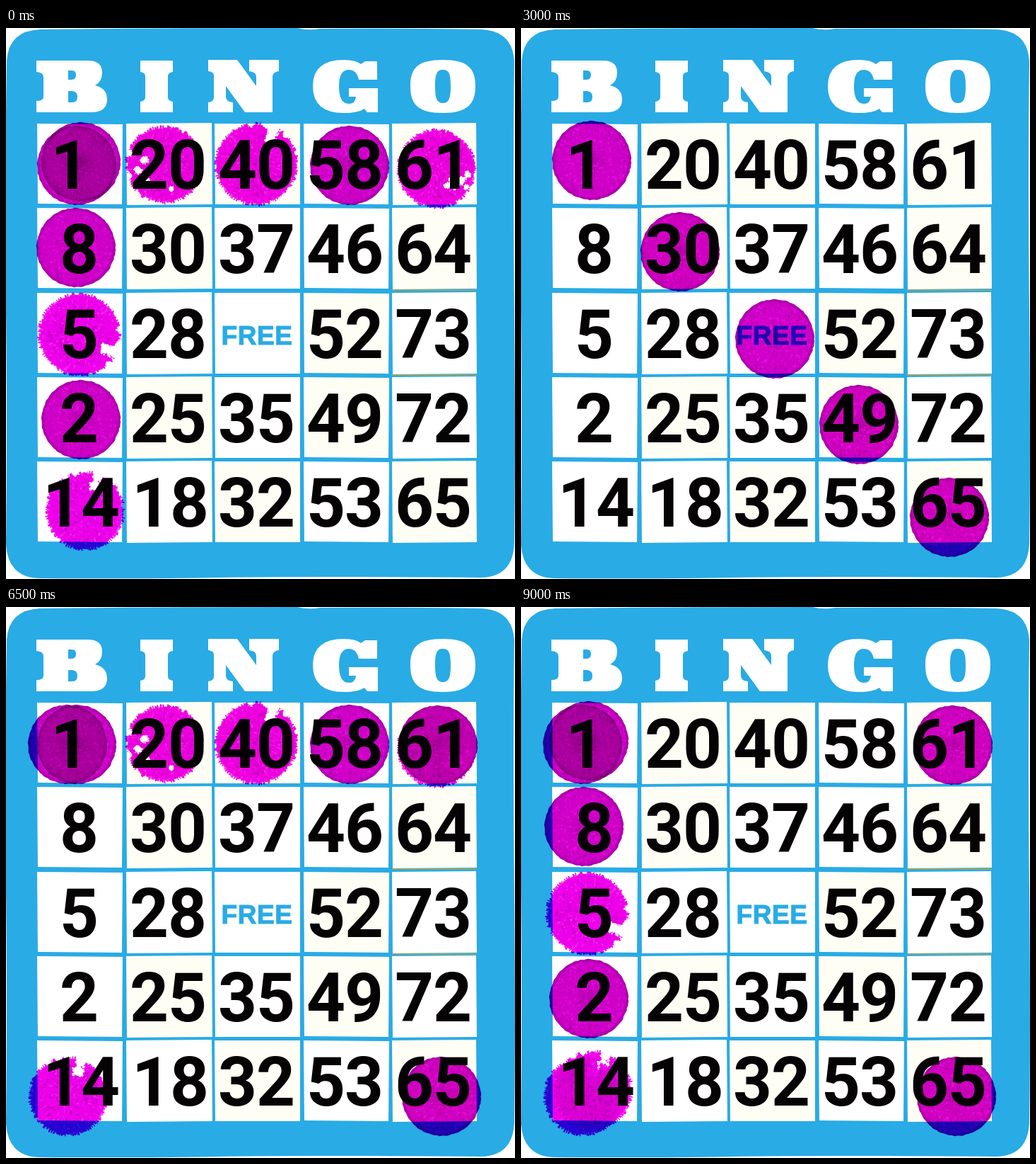
An HTML page with a canvas for the animation above (9500 ms loop, 720 by 778 pixels).

```html
<!DOCTYPE html>
<html lang="en">
<head>
<meta charset="utf-8">
<title>Bingo card</title>
<style>
  html, body { margin: 0; width: 100%; height: 100%; overflow: hidden; background: #fff; }
  body { position: relative; isolation: isolate; }
  svg, canvas { position: absolute; left: 0; top: 0; width: 720px; height: 778px; display: block; }
  canvas { mix-blend-mode: multiply; }
  .num { font: 600 96px Roboto, "Liberation Sans", sans-serif; letter-spacing: -1px; text-anchor: middle; fill: #050304; }
  .free { font: 700 37px "Liberation Sans", Arial, sans-serif; letter-spacing: .6px; text-anchor: middle; fill: #29abe5; stroke: #29abe5; }
</style>
</head>
<body>
<svg id="card" viewBox="0 0 720 778">
  <path fill="#29abe5" d="M48 2Q200 0 412 0Q428 4 444 1Q580 0 672 2Q717 4 719 48Q717 200 719 400T719 728Q717 775 672 776Q400 774 300 776T46 777Q3 775 0 730Q2 560 0 400T1 46Q4 4 48 2Z"/>
  <g fill="#fff" fill-rule="evenodd" role="img" aria-label="BINGO">
    <path d="M43 46H116Q136 46 136 63Q136 76 126 81Q143 85 143 101Q143 119 120 119H43V103Q53 103 53 97V69Q53 63 43 62ZM88 60H93Q99 60 99 66Q99 73 93 73H88ZM88 89H94Q101 90 101 97Q101 105 94 105H88Z"/>
    <path d="M190 46H236V62Q229 63 229 68V98Q229 103 236 104V119H190V104Q197 103 197 98V68Q197 63 190 62Z"/>
    <path d="M286 45H327L354 82V69Q354 62 344 61V45H386V61Q378 62 377 68V119H338L311 82V97Q311 104 321 105V119H286V105Q294 104 294 98V67Q294 62 286 61Z"/>
    <path d="M478 45Q495 45 502 51L508 47H525V73H499Q496 59 485 59Q471 59 471 82Q471 107 485 107Q494 107 495 97H485V85H526V119H511L507 114Q498 120 478 120Q434 120 434 82Q434 45 478 45Z"/>
    <path d="M618 45C653 45 664 57 664 82S653 120 618 120S572 108 572 82S583 45 618 45ZM618 59C609 59 607 66 607 82S609 106 618 106S629 98 629 82S627 59 618 59Z"/>
  </g>
</svg>
<canvas id="ink" width="720" height="778"></canvas>
<script>
const card = document.getElementById('card');
const ink = document.getElementById('ink').getContext('2d');

// ---- Card ----
function add(tag, attrs, text) {
  const el = document.createElementNS('http://www.w3.org/2000/svg', tag);
  for (const k in attrs) el.setAttribute(k, attrs[k]);
  if (text) el.textContent = text;
  card.append(el);
}

const lefts = [44, 170, 295, 421, 546], rights = [165, 291, 416, 542, 665];
const tops = [135, 254, 374, 493, 612];
const centers = [103, 229, 354, 479, 604];
const numbers = [
  [1, 20, 40, 58, 61],
  [8, 30, 37, 46, 64],
  [5, 28, 'FREE', 52, 73],
  [2, 25, 35, 49, 72],
  [14, 18, 32, 53, 65]
];
const cream = [20, 40, 61, 30, 64, 52, 25, 49, 32, 65];
const nudged = { 1: 90, 14: 106, 18: 232 };

numbers.forEach((row, r) => row.forEach((n, c) => {
  const x = lefts[c], y = tops[r], right = rights[c], bottom = y + 114;
  const skew = (r * 3 + c * 2) % 3 - 1;
  add('path', {
    d: `M${x} ${y}L${right} ${y - skew}L${right + skew} ${bottom}L${x + 1} ${bottom + skew}Z`,
    fill: cream.includes(n) ? '#fffef5' : '#fff'
  });
}));
for (const y of [370, 490]) add('path', { d: `M546 ${y}H666`, stroke: '#b9a04c', 'stroke-width': 1.5 });
numbers.forEach((row, r) => row.forEach((n, c) => {
  if (n === 'FREE') add('text', { x: 355, y: 447, class: 'free' }, n);
  else add('text', { x: nudged[n] || centers[c], y: 227 + r * 119.3, class: 'num' }, n);
}));

// ---- Dauber marks ----
const SIZE = 150, MID = SIZE / 2;

function randomFrom(seed) {
  return () => {
    seed = (seed * 1664525 + 1013904223) >>> 0;
    return seed / 4294967296;
  };
}

function newMark() {
  const el = document.createElement('canvas');
  el.width = el.height = SIZE;
  const g = el.getContext('2d');
  g.translate(MID, MID);
  return g;
}

function dot(g, x, y, r) {
  g.beginPath();
  g.arc(x, y, r, 0, 7);
  g.fill();
}

function mottle(g, rand, count, color, reach, size) {
  g.globalCompositeOperation = 'source-atop';
  g.fillStyle = g.strokeStyle = color;
  for (let i = 0; i < count; i++) {
    const a = rand() * 6.283, d = Math.sqrt(rand()) * reach, len = rand() * 6;
    const x = Math.cos(a) * d, y = Math.sin(a) * d;
    if (i % 2) dot(g, x, y, rand() * size);
    else {
      g.lineWidth = .5 + rand();
      g.beginPath();
      g.moveTo(x, y);
      g.lineTo(x + Math.cos(a) * len, y + Math.sin(a) * len);
      g.stroke();
    }
  }
  g.globalCompositeOperation = 'source-over';
}

function roundMark() {
  const g = newMark(), rand = randomFrom(7);
  const tone = g.createRadialGradient(0, 0, 4, 0, 0, 56);
  tone.addColorStop(0, '#bc00b4');
  tone.addColorStop(.45, '#d200ca');
  tone.addColorStop(.9, '#cc00c5');
  tone.addColorStop(1, '#a000a0');
  g.fillStyle = tone;
  g.beginPath();
  for (let a = 0; a < 6.28; a += .06) {
    const r = 55.2 + rand() * 1.2;
    g.lineTo(Math.cos(a) * r, Math.sin(a) * r);
  }
  g.fill();
  mottle(g, rand, 420, 'rgba(250,20,244,.4)', 52, 2);
  mottle(g, rand, 300, 'rgba(150,0,150,.25)', 56, 2.6);
  return g.canvas;
}

// Ragged blot; bites are [x, y, radius] areas left without ink.
function roughMark(seed, reach, bites) {
  const g = newMark(), rand = randomFrom(seed);
  g.fillStyle = g.strokeStyle = '#ee00ea';
  dot(g, 0, 0, reach - 4);
  g.lineCap = 'round';
  for (let a = 0; a < 6.283; a += .03) {
    const r = reach - 4 + rand() * 4.5;
    g.lineWidth = 1 + rand() * 1.5;
    g.beginPath();
    g.moveTo(Math.cos(a) * 40, Math.sin(a) * 40);
    g.lineTo(Math.cos(a) * r, Math.sin(a) * r);
    g.stroke();
  }
  mottle(g, rand, 400, 'rgba(195,0,195,.4)', 44, 2.8);
  mottle(g, rand, 200, 'rgba(255,90,255,.4)', 56, 1.8);
  g.globalCompositeOperation = 'destination-out';
  g.fillStyle = '#000';
  for (const [x, y, r] of bites) {
    dot(g, x, y, r * .75);
    for (let i = 0; i < 24; i++) {
      const a = rand() * 6.283, d = r * (.55 + rand() * .45);
      dot(g, x + Math.cos(a) * d, y + Math.sin(a) * d, .6 + rand() * r * .15);
    }
  }
  return g.canvas;
}

function turned(mark, quarter) {
  const g = newMark();
  g.rotate(quarter * Math.PI / 2);
  g.drawImage(mark, -MID, -MID);
  return g.canvas;
}

const disc = roundMark();
const speckled = roughMark(21, 55, [[-28, -7, 6], [-37, 8, 6], [-26, 22, 5], [-50, -16, 5], [10, 34, 4], [46, -32, 5], [-51, 16, 5]]);
const notched = roughMark(33, 59, [[20, -37, 9], [24, -50, 11], [-7, -57, 5], [14, -57, 7], [42, -41, 4]]);
const holed = roughMark(58, 56, [[24, 21, 9], [35, 16, 7], [44, 8, 5], [14, 24, 4], [42, 26, 4]]);
const sideNotched = turned(notched, 1);
const topHoled = roughMark(72, 56, [[14, -36, 9], [18, -49, 9], [-14, -55, 6], [-28, -48, 4], [36, -47, 5]]);

// ---- Patterns: lists of [mark, x, y] ----
const rowMarks = y => [
  [disc, 100, y], [speckled, 224, y - 1], [notched, 354, y - 2], [disc, 486, y], [holed, 609, y + 5]
];
const colMarks = x => [
  [disc, x, 189], [disc, x - 7, 310], [sideNotched, x - 2, 433], [disc, x, 553], [topHoled, x + 6, 682]
];
const rising = [[disc, 478, 316], [disc, 359, 439], [disc, 219, 560], [topHoled, 88, 691]];
const falling = [[disc, 100, 187], [disc, 225, 316], [disc, 359, 439], [disc, 478, 560], [disc, 606, 691]];
const corners = [[disc, 87, 194], [disc, 611, 195], [topHoled, 88, 691], [disc, 616, 691]];

const rowsDown = [194, 313, 425, 541, 672];
const rowsUp = [670, 541, 433, 313, 194];
const colsOut = [106, 225, 354, 483, 602];
const colsBack = [602, 483, 354, 225, 96];

const steps = [
  ...rowsDown.map((y, i) => [...rowMarks(y), ...colMarks(colsOut[i])]),
  [[disc, 602, 189], ...rising],
  falling,
  [...corners, ...falling],
  [...corners, ...rising],
  ...rowsUp.map(y => [...corners, ...rowMarks(y)]),
  ...colsBack.map(x => [...corners, ...colMarks(x)])
];

// ---- Playback ----
const STEP = 500;
const start = performance.now();
let shown = -1;

function draw(index) {
  ink.globalCompositeOperation = 'source-over';
  ink.clearRect(0, 0, 720, 778);
  ink.globalCompositeOperation = 'multiply';
  for (const [mark, x, y] of steps[index]) ink.drawImage(mark, x - MID, y - MID);
}

function tick() {
  const index = Math.floor((performance.now() - start) / STEP) % steps.length;
  if (index !== shown) draw(shown = index);
  requestAnimationFrame(tick);
}
tick();
</script>
</body>
</html>
```
